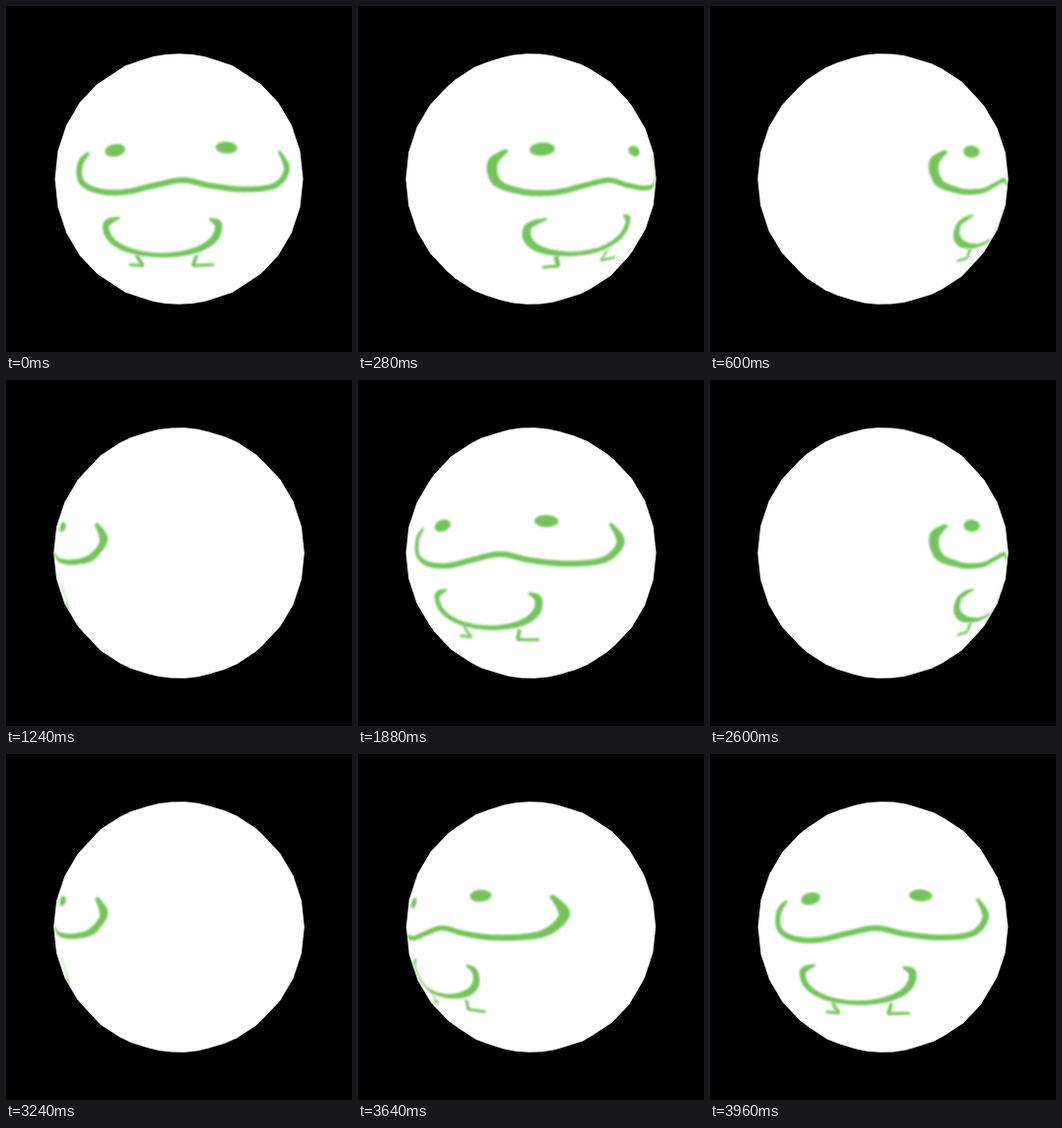
Animation of 350 by 350 pixels, one loop 4 s. Source, as an HTML page with a canvas:

```html
<!DOCTYPE html>
<html lang="en">
<head>
<meta charset="utf-8">
<title>Spinning face</title>
<style>
  html, body { margin: 0; width: 100%; height: 100%; overflow: hidden; background: #000; }
  canvas { display: block; }
</style>
</head>
<body>
<canvas id="stage" width="350" height="350"></canvas>
<script>
const ctx = document.getElementById('stage').getContext('2d');
const MID = 175;
const CAMERA = MID / Math.tan(Math.PI / 6);
const RADIUS = 117, COLS = 24, ROWS = 16;
const STEP_MS = 40, STEPS = 100;
const TURN = 3.602 * Math.PI / 180;
const INK = '#74c45c';

const { sin, cos, PI } = Math;
const range = (n, fn) => Array.from({ length: n }, (_, i) => fn(i));
const latitude = row => PI * (row / ROWS - 0.5);
const longitude = col => 2 * PI * col / COLS;
const dot = (a, b) => a[0] * b[0] + a[1] * b[1] + a[2] * b[2];

// The ball is a faceted globe: corners for its outline, planes for its faces.
const corners = range((ROWS + 1) * COLS, i => {
  const lat = latitude(Math.floor(i / COLS)), lon = longitude(i % COLS);
  return [RADIUS * cos(lat) * sin(lon), RADIUS * sin(lat), RADIUS * cos(lat) * cos(lon)];
});

const facets = range(ROWS * COLS, i => {
  const row = Math.floor(i / COLS), mid = longitude(i % COLS + 0.5);
  const a = latitude(row), b = latitude(row + 1), inset = cos(PI / COLS);
  const out = sin(b) - sin(a), up = inset * (cos(a) - cos(b));
  return {
    normal: [out * sin(mid), up, out * cos(mid)],
    offset: RADIUS * (out * inset * cos(a) + up * sin(a))
  };
});

// Casts a screen point of the front view onto the ball.
function toBall(x, y) {
  const eye = [0, 0, CAMERA], ray = [x - MID, y - MID, -CAMERA];
  let near = 0, normal;
  for (const f of facets) {
    const facing = dot(f.normal, ray);
    const t = (f.offset - dot(f.normal, eye)) / facing;
    if (facing < 0 && t > near) [near, normal] = [t, f.normal];
  }
  return { at: eye.map((v, k) => v + near * ray[k]), normal };
}

const spin = ([x, y, z], a) => [x * cos(a) + z * sin(a), y, z * cos(a) - x * sin(a)];

function project(point, angle) {
  const [x, y, z] = spin(point, angle), scale = CAMERA / (CAMERA - z);
  return { x: MID + x * scale, y: MID + y * scale };
}

function place({ at, normal }, angle) {
  const [x, y, z] = spin(at, angle);
  const seen = dot(spin(normal, angle), [-x, -y, CAMERA - z]) > 0;
  return { ...project(at, angle), seen };
}

// Strokes are lists of [x, y, width] in the front view.
const taper = t => Math.min(1, 0.4 + 9 * Math.min(t, 1 - t));

function curve(keys, width, n = 140) {
  const key = i => keys[Math.max(0, Math.min(keys.length - 1, i))];
  return range(n + 1, j => {
    const pos = j / n * (keys.length - 1);
    const i = Math.min(Math.floor(pos), keys.length - 2), t = pos - i;
    const [x, y] = [0, 1].map(k => {
      const a = key(i - 1)[k], b = key(i)[k], c = key(i + 1)[k], d = key(i + 2)[k];
      return b + t * (c - a + t * (2 * a - 5 * b + 4 * c - d + t * (3 * b - a - 3 * c + d))) / 2;
    });
    return [x, y, width * taper(j / n)];
  });
}

function bowl(x, y, rx, depth, rim, from, to, n = 100) {
  return range(n + 1, i => {
    const a = from + (to - from) * i / n, c = cos(a), s = sin(a);
    const drop = s > 0 ? depth * s ** 0.85 : rim * s;
    return [x + rx * c, y + drop, (4.6 + 2.4 * c * c + 0.5 * c) * taper(i / n)];
  });
}

function oval(x, y, rx, ry, tilt, n = 32) {
  return range(n + 1, i => {
    const a = PI * (1 - i / n), u = rx * cos(a);
    return [x + u * cos(tilt), y + u * sin(tilt), 2 * ry * sin(a)];
  });
}

const line = (x1, y1, x2, y2, width) =>
  range(9, i => [x1 + (x2 - x1) * i / 8, y1 + (y2 - y1) * i / 8, width]);

const foot = (x, ankle, toe) => [
  line(x, 252, ankle, 263, 3.6),
  line(ankle, 262.5, toe, 261.7, 3)
];

const mouth = [
  [84, 148], [75, 160], [76.5, 178], [94, 187.2], [120, 188.2], [150, 181.5], [179, 176.2],
  [208, 182], [242, 185.5], [272, 181.5], [284, 165], [276, 146.5]
];

// Both edges of a stroke, laid on the ball.
function ribbon(samples) {
  return samples.map(([x, y, w], i) => {
    const a = samples[Math.max(0, i - 1)], b = samples[Math.min(samples.length - 1, i + 1)];
    const dx = b[0] - a[0], dy = b[1] - a[1], k = w / 2 / Math.hypot(dx, dy);
    return [toBall(x - dy * k, y + dx * k), toBall(x + dy * k, y - dx * k)];
  });
}

const face = [
  curve(mouth, 5.8),
  bowl(158, 222, 57, 30, 12, -0.58, PI + 0.72),
  ...foot(132, 138.5, 124.5),
  ...foot(193, 189, 210.5),
  oval(110.3, 146, 10.5, 6.3, -0.2),
  oval(223, 143.3, 11, 6, 0.06)
].map(ribbon);

function hull(points) {
  points.sort((a, b) => a.x - b.x || a.y - b.y);
  const half = list => {
    const out = [];
    for (const p of list) {
      while (out.length > 1) {
        const [a, b] = out.slice(-2);
        if ((b.x - a.x) * (p.y - a.y) - (b.y - a.y) * (p.x - a.x) > 0) break;
        out.pop();
      }
      out.push(p);
    }
    return out.slice(0, -1);
  };
  return [...half(points), ...half([...points].reverse())];
}

function trace(points) {
  ctx.beginPath();
  points.forEach(p => ctx.lineTo(p.x, p.y));
  ctx.closePath();
}

function drawStroke(edges, angle) {
  let left = [], right = [];
  const flush = () => {
    if (left.length > 1) {
      trace([...left, ...right.reverse()]);
      ctx.fill();
    }
    left = [];
    right = [];
  };
  for (const [a, b] of edges) {
    const p = place(a, angle), q = place(b, angle);
    if (p.seen || q.seen) {
      left.push(p);
      right.push(q);
    } else flush();
  }
  flush();
}

function draw(angle) {
  ctx.fillStyle = '#000';
  ctx.fillRect(0, 0, 350, 350);
  ctx.save();
  trace(hull(corners.map(v => project(v, angle))));
  ctx.fillStyle = '#fff';
  ctx.fill();
  ctx.clip();
  ctx.fillStyle = INK;
  ctx.filter = 'blur(0.9px)';
  for (const side of [0, PI]) face.forEach(edges => drawStroke(edges, angle + side));
  ctx.restore();
}

let shown = -1;
function tick() {
  const step = Math.floor(performance.now() / STEP_MS) % STEPS;
  if (step !== shown) draw((shown = step) * TURN);
  requestAnimationFrame(tick);
}
tick();
</script>
</body>
</html>
```
